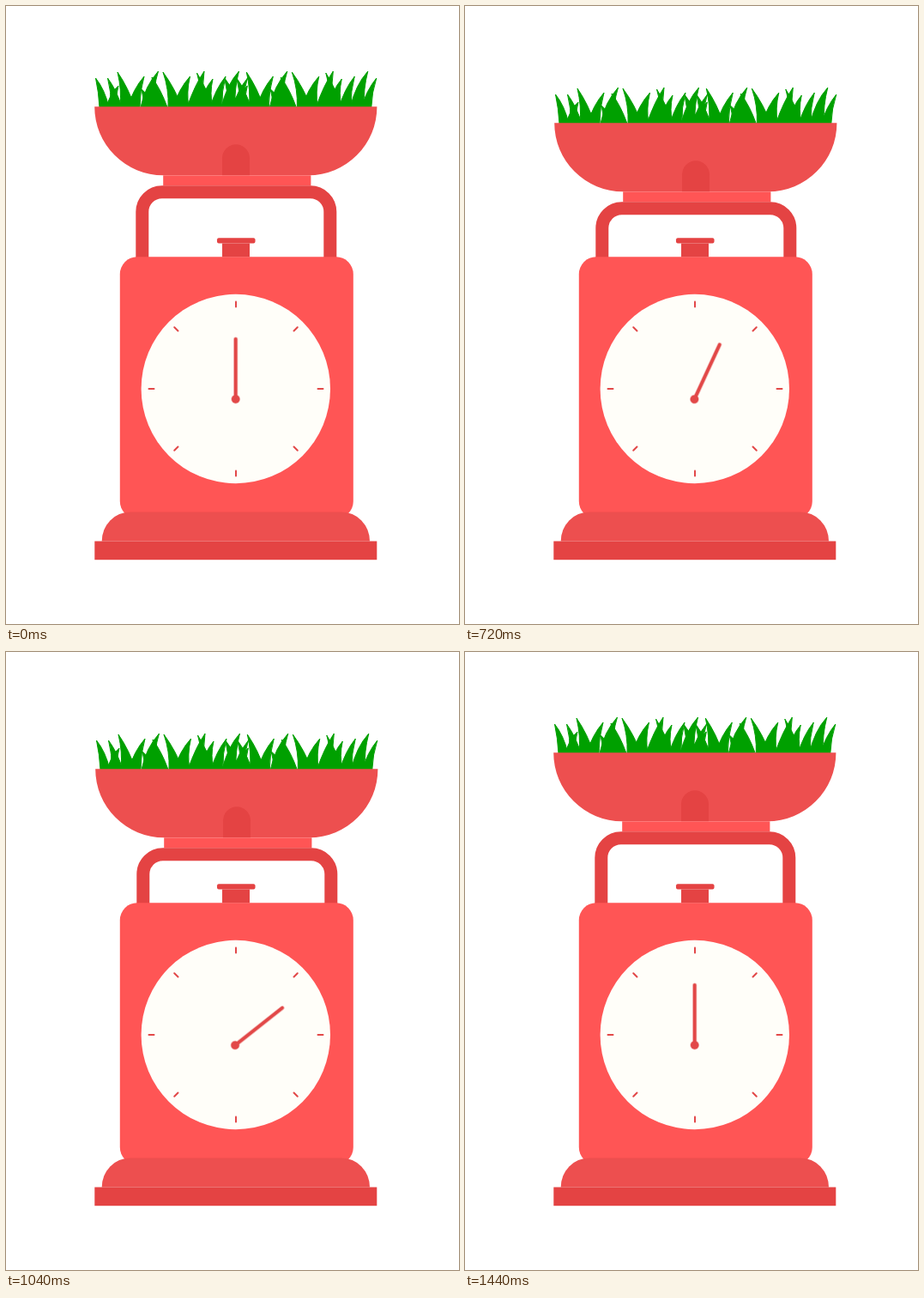
Write an HTML page without scripts that moves like this. It is 528 by 720 pixels and loops after 1480 ms.

```html
<!DOCTYPE html>
<html lang="en">
<head>
<meta charset="utf-8">
<title>Kitchen scale</title>
<style>
  @property --press { syntax: "<number>"; inherits: false; initial-value: 0; }
  @property --turn { syntax: "<number>"; inherits: false; initial-value: 0; }

  html, body { margin: 0; width: 100%; height: 100%; overflow: hidden; background: #fff; }
  svg { display: block; width: 528px; height: 720px; }

  .light { fill: #ff5555; }
  .mid { fill: #ed4f4f; }
  .dark { fill: #e44343; }
  .line { fill: none; stroke: #e24848; stroke-linecap: round; }
  .hub { fill: #e24848; }
  .grass { fill: #00a000; stroke: #00a000; stroke-linejoin: round; }

  /* Both parts advance in 40 ms ticks; the small lead keeps ticks clear of rounding. */
  .pan, .needle { animation: 1480ms -4ms infinite; }

  .pan {
    --ease: calc(var(--press) * var(--press) * (3 - 2 * var(--press)));
    animation-name: press;
    transform: translate(calc(2px * var(--ease)), calc(38px * var(--ease)));
  }
  @keyframes press {
    0% { --press: 0; }
    32.4324% { --press: 0; animation-timing-function: steps(12); }
    64.8649% { --press: 1; animation-timing-function: steps(4); }
    75.6757%, 100% { --press: 0; }
  }

  .needle {
    animation-name: turn;
    transform-origin: 267.3px 457.4px;
    transform: rotate(calc(62deg * var(--turn)));
  }
  @keyframes turn {
    0% { --turn: 0; }
    37.8378% { --turn: 0; animation-timing-function: steps(10); }
    64.8649% { --turn: 1; animation-timing-function: steps(12); }
    97.2973%, 100% { --turn: 0; }
  }
</style>
</head>
<body>
<svg viewBox="0 0 528 720">
  <defs>
    <path id="tuft" d="
      M109 118Q108 100 104.500 84Q115 97 120 118Z
      M122 118Q123 100 118.500 84Q129 98 135 118Z
      M117 118Q122 100 131 93Q128 104 128 118Z
      M133 118Q135 98 130 77Q143 96 150 118Z
      M142 118Q148 97 161 82Q156 99 156 118Z
      M160 118Q161 105 157 96Q167 104 171 118Z
      M157 118Q162 93 177.500 76Q171 96 174 118Z
      M173 118Q174 98 170 83Q181 98 188 118Z
      M189 118Q190 97 183 77Q197 96 205 118Z
      M195 118Q201 97 214.500 82Q210 100 213 118Z
      M211 118Q220 92 231 76Q228 97 230 118Z
      M225 118Q228 96 222.500 78Q234 96 241 118Z
      M225 118Q230 98 241 85Q237 102 241 118Z
      M238 118Q244 97 256 82Q251 100 252 118Z
      M251 118Q257 92 271.500 76Q266 97 267 118Z
      M264 118Q270 98 281.500 84Q276 101 275.500 118Z"/>
    <path id="tick" d="M268 344.500V350.500"/>
    <g id="ticks">
      <use href="#tick"/>
      <use href="#tick" transform="rotate(45 268 446)"/>
      <use href="#tick" transform="rotate(90 268 446)"/>
      <use href="#tick" transform="rotate(135 268 446)"/>
    </g>
  </defs>

  <g class="pan">
    <g class="grass">
      <use href="#tuft"/>
      <use href="#tuft" x="150.300"/>
    </g>
    <path class="mid" d="M103.200 117.300H432.400A80 80 0 0 1 352.400 197.300H183.200A80 80 0 0 1 103.200 117.300Z"/>
    <path class="dark" d="M252 197.300V177.300a16 16 0 0 1 32 0V197.300Z"/>
    <rect class="light" x="183.200" y="197.300" width="172.200" height="12"/>
    <path d="M158.800 310V239.800a23 23 0 0 1 23-23H354.800a23 23 0 0 1 23 23V310" fill="none" stroke="#e44343" stroke-width="15"/>
  </g>

  <rect class="dark" x="246" y="270.200" width="44.500" height="6.300" rx="2"/>
  <rect class="dark" x="252" y="276.500" width="32" height="16"/>
  <rect class="light" x="132.800" y="292.300" width="272" height="304.700" rx="20"/>
  <path class="mid" d="M111.700 623.500A33 34 0 0 1 144.700 589.500H391A33 34 0 0 1 424 623.500Z"/>
  <rect class="dark" x="103.300" y="623.500" width="329" height="21.700"/>

  <circle cx="267.800" cy="446" r="110.200" fill="#fffef9"/>
  <g class="line" stroke-width="2">
    <use href="#ticks"/>
    <use href="#ticks" transform="rotate(180 268 446)"/>
  </g>

  <g class="needle">
    <g opacity=".4">
      <path class="line" stroke-width="5.200" d="M267.700 388V458"/>
      <circle class="hub" cx="267.700" cy="458" r="5.400"/>
    </g>
    <path class="line" stroke-width="3.600" d="M267.700 388V458"/>
    <circle class="hub" cx="267.700" cy="458" r="4.700"/>
  </g>
</svg>
</body>
</html>
```
